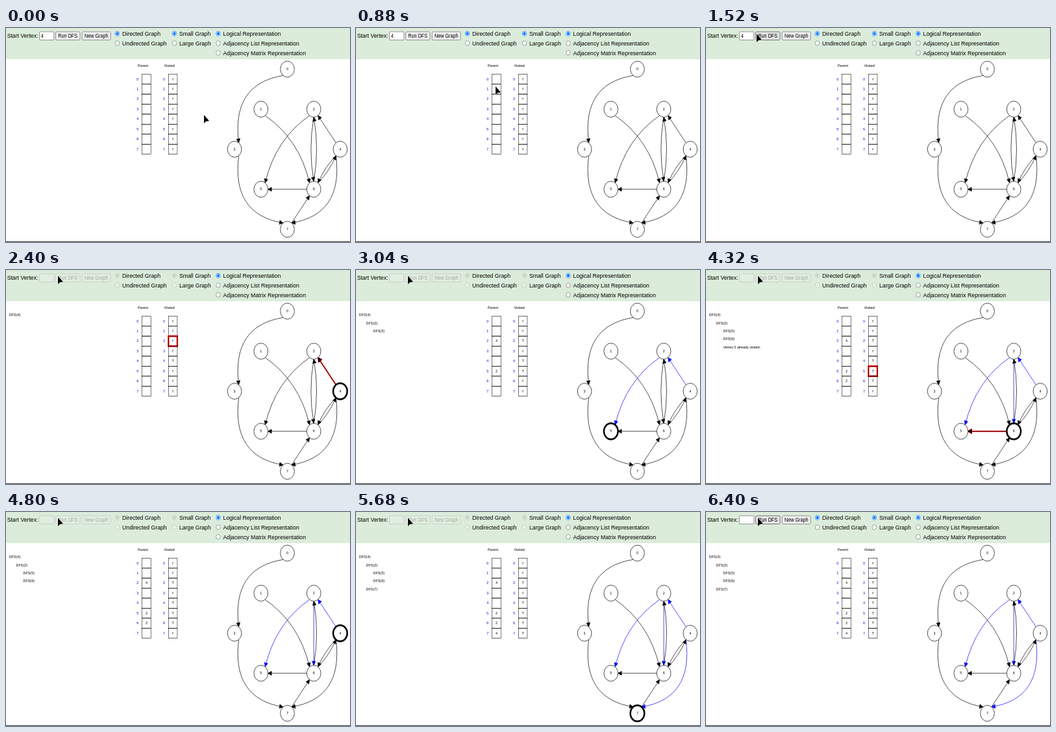
Animation, 530 px wide and 330 px high, one loop 6.64 s. Source, as an HTML page with a canvas:

```html
<!DOCTYPE html>
<html lang="en">
<head>
<meta charset="utf-8">
<title>Depth-first search</title>
<style>
  html, body { margin: 0; width: 100%; height: 100%; overflow: hidden; background: #fff; }
  canvas { display: block; width: 530px; height: 330px; }
</style>
</head>
<body>
<canvas id="stage" width="530" height="330"></canvas>
<script>
const ctx = document.getElementById('stage').getContext('2d');
const LOOP = 6640, RUN_START = 1840, RUN_END = 6160, MOVE_TIME = 150;
const SCALE_X = 0.5427, SCALE_Y = 0.6175, PANEL_HEIGHT = 48;
const RADIUS = 20, CELL = 25;

const vertices = [
  [800, 25], [725, 125], [875, 125], [650, 225],
  [950, 225], [725, 325], [875, 325], [800, 425]
];

// from, to, curvature; 0.1 separates the two directions of a pair
const PAIR_CURVE = 0.1;
const edges = [
  [0, 3, 0.5], [1, 6, -0.2], [2, 5, 0.2], [2, 6, PAIR_CURVE], [6, 2, PAIR_CURVE],
  [3, 7, 0.5], [4, 2, 0], [4, 6, PAIR_CURVE], [6, 4, PAIR_CURVE], [4, 7, -0.5],
  [6, 5, 0], [7, 6, 0]
];

// time, action, vertex, neighbor
const steps = [
  [1840, 'visit', 4], [2120, 'look', 4, 2], [2470, 'go', 4, 2],
  [2640, 'visit', 2], [2760, 'look', 2, 5], [2880, 'go', 2, 5],
  [3030, 'visit', 5], [3340, 'back', 5, 2],
  [3500, 'look', 2, 6], [3660, 'go', 2, 6], [3820, 'visit', 6],
  [3910, 'look', 6, 2], [4090, 'look', 6, 4], [4280, 'look', 6, 5],
  [4460, 'back', 6, 2], [4625, 'back', 2, 4],
  [4860, 'look', 4, 6], [5050, 'look', 4, 7], [5270, 'go', 4, 7],
  [5440, 'visit', 7], [5720, 'look', 7, 6], [5900, 'back', 7, 4]
];

const cursorPath = [
  [720, 305, 134], [800, 268, 117], [880, 215, 90], [960, 156, 62], [1040, 120, 45],
  [1280, 120, 45], [1360, 98, 26], [1440, 84, 13], [1520, 78, 9], [1600, 79, 9], [1680, 80, 9]
];

function searchState(time) {
  const state = { visited: {}, parent: {}, tree: new Set(), labels: [], look: null, ring: null };
  const depth = { 4: 0 };
  for (const [start, action, vertex, next] of steps) {
    if (start > time) break;
    state.look = null;
    if (action === 'visit') {
      state.visited[vertex] = true;
      state.labels.push([`DFS(${vertex})`, depth[vertex]]);
      state.ring = vertices[vertex];
    } else if (action === 'look') {
      state.look = { vertex, next, depth: depth[vertex] };
    } else {
      if (action === 'go') {
        state.parent[next] = vertex;
        state.tree.add(`${vertex}-${next}`);
        depth[next] = depth[vertex] + 1;
      }
      const progress = Math.min(1, (time - start) / MOVE_TIME);
      const [x1, y1] = vertices[vertex], [x2, y2] = vertices[next];
      state.ring = [x1 + (x2 - x1) * progress, y1 + (y2 - y1) * progress];
    }
  }
  if (time >= RUN_END) state.ring = null;
  return state;
}

function text(string, x, y, { size = 10, align = 'center', color = '#000' } = {}) {
  ctx.font = `${size}px "Liberation Sans", Arial, sans-serif`;
  ctx.textAlign = align;
  ctx.textBaseline = 'middle';
  ctx.fillStyle = color;
  ctx.fillText(string, x, y);
}

function ellipse(x, y, radius, stroke, width, fill) {
  ctx.beginPath();
  ctx.arc(x, y, radius, 0, Math.PI * 2);
  if (fill) { ctx.fillStyle = fill; ctx.fill(); }
  if (stroke) { ctx.strokeStyle = stroke; ctx.lineWidth = width; ctx.stroke(); }
}

function box(x, y, width, height, fill, stroke, radius = 3) {
  ctx.beginPath();
  ctx.roundRect(x, y, width, height, radius);
  ctx.fillStyle = fill;
  ctx.fill();
  ctx.strokeStyle = stroke;
  ctx.lineWidth = 1.3;
  ctx.stroke();
}

function drawEdge(from, to, curve, color, width) {
  const [ax, ay] = vertices[from], [bx, by] = vertices[to];
  const length = Math.hypot(bx - ax, by - ay);
  const ux = (bx - ax) / length * RADIUS, uy = (by - ay) / length * RADIUS;
  const x1 = ax + ux, y1 = ay + uy, x2 = bx - ux, y2 = by - uy;
  const controlX = (x1 + x2) / 2 - (y2 - y1) * curve;
  const controlY = (y1 + y2) / 2 + (x2 - x1) * curve;
  const reach = Math.hypot(controlX - x2, controlY - y2);
  const dx = (controlX - x2) / reach, dy = (controlY - y2) / reach;
  ctx.strokeStyle = ctx.fillStyle = color;
  ctx.lineWidth = width;
  ctx.beginPath();
  ctx.moveTo(x1, y1);
  ctx.quadraticCurveTo(controlX, controlY, x2, y2);
  ctx.stroke();
  ctx.beginPath();
  ctx.moveTo(x2, y2);
  ctx.lineTo(x2 + dx * 10 - dy * 5, y2 + dy * 10 + dx * 5);
  ctx.lineTo(x2 + dx * 10 + dy * 5, y2 + dy * 10 - dx * 5);
  ctx.closePath();
  ctx.fill();
  ctx.stroke();
}

function drawTable(title, x, value, highlighted, pulse) {
  text(title, x - 10, 17);
  for (let i = 0; i < 8; i++) {
    const y = 50 + i * CELL, left = x - CELL / 2, top = y - CELL / 2;
    text(i, x - CELL, y, { color: '#00f' });
    if (i === highlighted) {
      ctx.strokeStyle = '#f00';
      ctx.lineWidth = 1 + pulse;
      ctx.strokeRect(left, top, CELL, CELL);
    }
    ctx.strokeStyle = '#000';
    ctx.lineWidth = 1;
    ctx.strokeRect(left, top, CELL, CELL);
    text(value(i), x, y);
  }
}

function drawSearch(time) {
  const state = searchState(time), { look } = state;
  const pulse = 1 + 5 * Math.abs((time / 420) % 1 * 2 - 1);
  ctx.setTransform(SCALE_X, 0, 0, SCALE_Y, -0.66, PANEL_HEIGHT);

  drawTable('Parent', 400, i => state.parent[i] ?? '');
  drawTable('Visited', 475, i => state.visited[i] ? 'T' : 'f', look?.next, pulse);

  state.labels.forEach(([label, depth], row) =>
    text(label, 10 + depth * 20, 35 + row * 20, { align: 'left' }));
  if (look && state.visited[look.next]) {
    text(`Vertex ${look.next} already visited.`, 10 + look.depth * 20,
      35 + state.labels.length * 20, { align: 'left' });
  }

  for (const [from, to, curve] of edges) {
    const inTree = state.tree.has(`${from}-${to}`);
    const bend = inTree && curve === PAIR_CURVE ? 0 : curve;
    if (look && look.vertex === from && look.next === to) drawEdge(from, to, bend, '#f00', pulse);
    drawEdge(from, to, bend, inTree ? '#00f' : '#000', 1.2);
  }
  vertices.forEach(([x, y], i) => {
    ellipse(x, y, RADIUS, '#000', 1.2, '#fff');
    text(i, x, y);
  });
  if (state.ring) ellipse(...state.ring, RADIUS, '#000', 4.5);
}

function drawButton(label, x, width, disabled, hover) {
  const fill = disabled ? 'rgba(239,239,239,.3)' : hover ? '#e5e5e5' : '#efefef';
  const stroke = disabled ? 'rgba(118,118,118,.3)' : hover ? '#4f4f4f' : '#767676';
  box(x, 9.5, width, 20.5, fill, stroke);
  text(label, x + width / 2, 20, { size: 13.33, color: disabled ? 'rgba(16,16,16,.3)' : '#000' });
}

function drawRadios(x, labels, disabled) {
  labels.forEach((label, row) => {
    const y = 14 + row * 24, checked = row === 0;
    const color = disabled ? 'rgba(118,118,118,.3)' : checked ? '#0075ff' : '#767676';
    ellipse(x, y, 6, color, 1.2, disabled ? 'rgba(255,255,255,.3)' : '#fff');
    if (checked) ellipse(x, y, 3.8, null, 0, color);
    text(label, x + 14, y + 1.2, { size: 16, align: 'left' });
  });
}

function drawPanel(time) {
  ctx.setTransform(1, 0, 0, 1, 0, 0);
  ctx.fillStyle = '#dcecda';
  ctx.fillRect(0, 0, 530, PANEL_HEIGHT);
  ctx.fillStyle = '#333';
  ctx.fillRect(0, 329, 530, 1);

  const running = time >= RUN_START && time < RUN_END;
  ctx.setTransform(SCALE_X, 0, 0, SCALE_Y, 0, 0);
  text('Start Vertex:', 3, 19.5, { size: 16, align: 'left' });
  box(95, 9.5, 41, 20.5, running ? 'rgba(239,239,239,.3)' : '#fff',
    running ? 'rgba(118,118,118,.3)' : '#767676', 1);
  if (time < RUN_START) text('4', 99, 20, { size: 13.33, align: 'left' });
  drawButton('Run DFS', 141, 69, running, time >= 1440);
  drawButton('New Graph', 216, 81, running, false);
  drawRadios(316, ['Directed Graph', 'Undirected Graph'], running);
  drawRadios(478, ['Small Graph', 'Large Graph'], running);
  drawRadios(602.5, ['Logical Representation', 'Adjacency List Representation',
    'Adjacency Matrix Representation'], false);
}

function drawCursor(time) {
  const [, x, y] = cursorPath.findLast(([start]) => start <= time) ?? cursorPath[0];
  ctx.setTransform(1, 0, 0, 1, x, y);
  ctx.beginPath();
  [[0, 0], [0, 13], [3, 10], [8, 9.2]].forEach(point => ctx.lineTo(...point));
  ctx.closePath();
  ctx.strokeStyle = '#fff';
  ctx.lineWidth = 1;
  ctx.stroke();
  ctx.fillStyle = '#000';
  ctx.fill();
}

function draw(now) {
  const time = now % LOOP;
  ctx.setTransform(1, 0, 0, 1, 0, 0);
  ctx.fillStyle = '#fff';
  ctx.fillRect(0, 0, 530, 330);
  drawPanel(time);
  drawSearch(time);
  drawCursor(time);
}

const startTime = performance.now();
function tick() {
  draw(performance.now() - startTime);
  requestAnimationFrame(tick);
}
tick();
</script>
</body>
</html>
```
